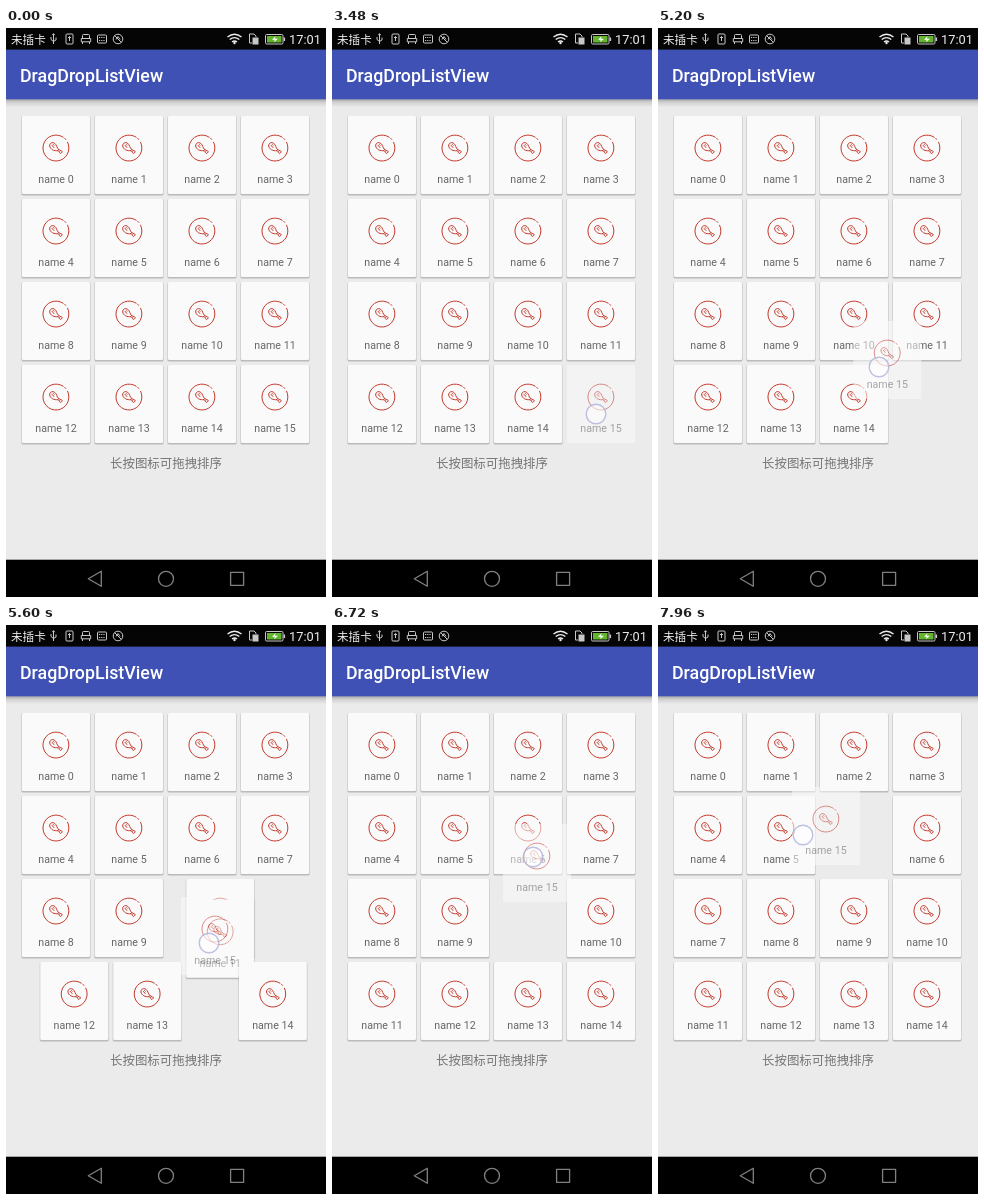
Recreate the animation shown at these times as an HTML page. Size 320x569 px, loop 8 s.

```html
<!DOCTYPE html>
<html lang="zh">
<head>
<meta charset="utf-8">
<title>DragDropListView</title>
<style>
  html, body { margin: 0; width: 100%; height: 100%; overflow: hidden; background: #ebebeb; }
  svg { display: block; width: 100vw; height: 100vh; }
  text { font-family: Roboto, "Noto Sans CJK SC", "Noto Sans CJK", sans-serif; }
  .line { fill: none; stroke: #c4392c; stroke-width: 1; stroke-linecap: round; stroke-linejoin: round; }
  .label { font-size: 10.67px; fill: #666; text-anchor: middle; }
  .nav { fill: none; stroke: #808080; stroke-width: 1.3; stroke-linejoin: round; }
  .status { fill: none; stroke: #c8c8c8; stroke-width: 1; }
</style>
</head>
<body>
<svg viewBox="0 0 320 569" preserveAspectRatio="none">
  <defs>
    <linearGradient id="fade" x2="0" y2="1">
      <stop offset="0" stop-color="#000" stop-opacity=".3"/>
      <stop offset=".4" stop-color="#000" stop-opacity=".12"/>
      <stop offset="1" stop-color="#000" stop-opacity="0"/>
    </linearGradient>
    <g id="shade">
      <rect x="-.9" y="0" width="69.8" height="80" rx="1.8" fill="#000" opacity=".07"/>
      <rect x="-.3" y=".2" width="68.6" height="79" rx="1.5" fill="#000" opacity=".14"/>
    </g>
    <g id="face">
      <rect width="68" height="78" rx="1.3" fill="#fafafa"/>
      <g class="line" transform="translate(34 32)">
        <path d="M11.6 -5.8A13 13 0 1 1 7.2 -10.8M8.8 -9.6L9.7 -8.6"/>
        <path d="M1.7 2.7C-1.8 3.2 -5.8 1.4 -6.3 -2C-6.6 -5 -3.5 -6.3 -1.2 -4.6C.9 -3 .5 -.3 2.5 1.4"/>
        <path d="M1.7 2.7L3.5 3.6C3 5.4 4.8 6 5.3 4.7C6.8 4.7 6.6 2.7 5 2.9L2.5 1.4M-3.9 -2.6L-2.1 -.5M-2.7 -3.5L-2 -2.8"/>
      </g>
    </g>
  </defs>

  <rect width="320" height="569" fill="#ebebeb"/>
  <rect y="71" width="320" height="8" fill="url(#fade)"/>
  <rect y="21" width="320" height="50.3" fill="#3f51b5"/>
  <text x="14" y="53.5" font-size="17.8" font-weight="500" fill="#fff">DragDropListView</text>

  <rect width="320" height="21.6" fill="#050505"/>
  <text x="5" y="15.8" font-size="11.6" fill="#eee">未插卡</text>
  <g class="status">
    <path d="M47.5 6V16M45 9V11.5L47.5 13.5L50 12V9.5M46.3 7.2L47.5 5.6L48.7 7.2"/>
    <rect x="60" y="6" width="7" height="10" rx="1"/>
    <path d="M63.5 8.5V13M62 10L63.5 8.5L65 10"/>
    <path d="M76.5 10V7.5Q76.5 6.5 77.5 6.5H82.5Q83.5 6.5 83.5 7.5V10M75.3 10.5H84.7V13.8H75.3ZM76.5 14V16M83.5 14V16"/>
    <rect x="91.5" y="7" width="9" height="8" rx="1"/>
    <path d="M93 9.5H99M93 12.5H99" stroke-dasharray="1.2 1"/>
    <circle cx="112" cy="11" r="4.8"/>
    <path d="M108.6 7.6L115.4 14.4M110 11.5L112 8.5L114 11.5"/>
    <path d="M221.5 9Q228.5 3.5 235.5 9M223.7 11.5Q228.5 7.7 233.3 11.5M226 14Q228.5 12 231 14" stroke="#eee" stroke-width="1.4"/>
    <path d="M243.5 15V6H248L250 8V9M243.5 15H246"/>
    <rect x="247" y="10" width="5" height="6" fill="#c8c8c8"/>
    <rect x="259.5" y="6.5" width="17.5" height="9.5" rx="1.2"/>
    <path d="M278.3 9.5V13" stroke-width="1.6"/>
  </g>
  <circle cx="228.5" cy="15" r="1.2" fill="#eee"/>
  <rect x="261" y="8" width="14.5" height="6.5" fill="#62b52d"/>
  <path d="M266 11.8L269.5 8.3L269 10.8H272L268 14.2L268.8 11.8Z" fill="#fff"/>
  <text x="283" y="16" font-size="12.8" fill="#eee">17:01</text>

  <text x="160" y="439.7" font-size="12.44" fill="#757575" text-anchor="middle">长按图标可拖拽排序</text>

  <rect y="531.7" width="320" height="38" fill="#000"/>
  <path class="nav" d="M95.3 543.3V558.3L82.3 550.8Z"/>
  <circle class="nav" cx="160" cy="550.8" r="7.5"/>
  <rect class="nav" x="224.6" y="544.3" width="13" height="13"/>

  <g id="grid"></g>
  <g id="drag" opacity=".55"></g>
  <g id="touch">
    <circle r="9.8" fill="#fff" fill-opacity=".5" stroke="#a9add8" stroke-opacity=".75" stroke-width="1.4"/>
  </g>
</svg>
<script>
const LOOP = 8000, STEP = 40, TOUCH = 2040, LIFT = 3280, SHIFT = 300, LAST = 15;

// start time, first and last item that slide one cell onward
const shifts = [[5333, 14, 14], [5500, 10, 13], [7064, 6, 9]];

// time, x, y
const tilePath = [
  [4320, 235, 337], [4680, 217, 322], [5100, 200, 299], [5400, 186, 281], [5600, 175, 272],
  [6720, 171, 199], [7280, 170, 165], [7680, 151, 163], [7960, 134, 162]
];
const touchPath = [
  [4320, 264, 386], [4680, 240, 365], [5100, 226, 345], [5400, 211, 327], [5600, 203, 318],
  [6720, 201, 232], [7280, 196, 211], [7680, 170, 211], [7960, 145, 210]
];

const byId = id => document.getElementById(id);
const mix = (a, b, k) => a + (b - a) * k;
const clamp = v => Math.min(1, Math.max(0, v));
const ease = k => (1 - Math.cos(Math.PI * k)) / 2;
const cell = i => [16 + 73 * (i % 4), 88 + 83 * Math.floor(i / 4)];
const place = (el, [x, y]) => el.setAttribute("transform", `translate(${x.toFixed(2)} ${y.toFixed(2)})`);

const face = i => `<use href="#face"/><text class="label" x="34" y="67">name ${i}</text>`;

const tiles = Array.from({ length: LAST + 1 }, (_, i) => {
  const g = document.createElementNS("http://www.w3.org/2000/svg", "g");
  g.innerHTML = `<use href="#shade"/>${face(i)}`;
  byId("grid").append(g);
  return g;
});
const drag = byId("drag"), touch = byId("touch");
drag.innerHTML = face(LAST);

function along(path, t) {
  const n = path.findIndex(p => p[0] > t);
  if (n === 0) return path[0].slice(1);
  if (n < 0) return path[path.length - 1].slice(1);
  const a = path[n - 1], b = path[n], k = (t - a[0]) / (b[0] - a[0]);
  return [mix(a[1], b[1], k), mix(a[2], b[2], k)];
}

function tileAt(i, t) {
  const shift = shifts.find(s => i >= s[1] && i <= s[2]);
  const from = cell(i);
  if (!shift) return from;
  const to = cell(i + 1), k = ease(clamp((t - shift[0]) / SHIFT));
  return [mix(from[0], to[0], k), mix(from[1], to[1], k)];
}

const show = (el, on) => el.setAttribute("visibility", on ? "visible" : "hidden");

function draw(now) {
  const t = Math.floor((now % LOOP) / STEP) * STEP;
  tiles.forEach((el, i) => place(el, tileAt(i, t)));
  show(tiles[LAST], t < LIFT);
  show(drag, t >= LIFT);
  show(touch, t >= TOUCH);
  place(drag, along(tilePath, t));
  place(touch, along(touchPath, t));
}

const start = performance.now();
function tick() {
  draw(performance.now() - start);
  requestAnimationFrame(tick);
}
tick();
</script>
</body>
</html>
```
